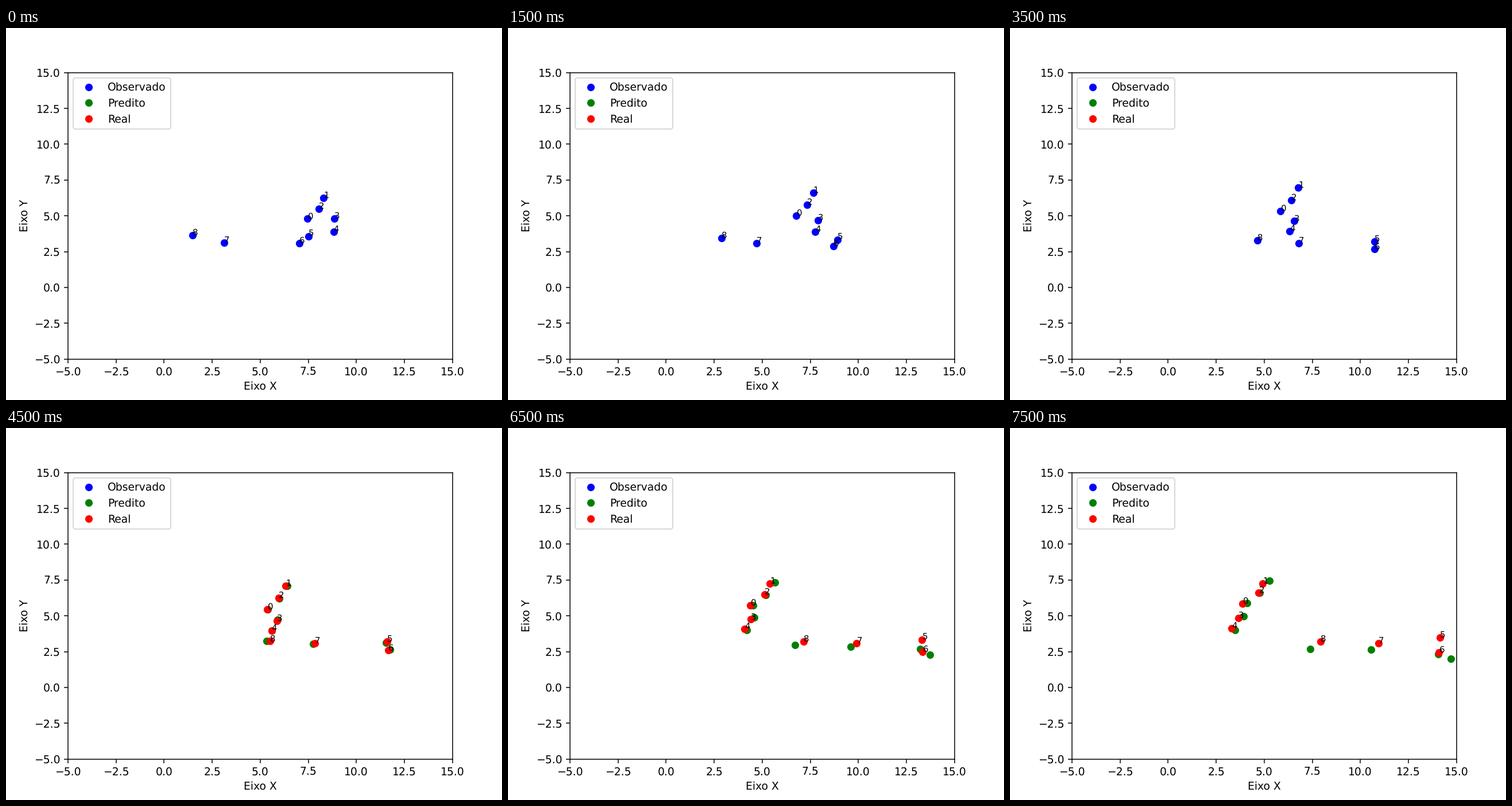
Recreate the animation shown at these times as a matplotlib script. Size 864 by 648 pixels, loop 8000 ms.

```python
import matplotlib.pyplot as plt
import numpy as np
from matplotlib.animation import FuncAnimation

WIDTH, HEIGHT, DPI = 864, 648, 135
N_FRAMES, INTERVAL = 16, 500
LAST_SEEN, LAST = 7, N_FRAMES - 1

# Each walker: start, position when last observed, end, forecast end (stage x, y).
WALKERS = np.array([
    [(525, 332.4), (471, 319.2), (405, 305.8), (413, 305.2)],
    [(553, 296.2), (502.3, 277.6), (440.4, 271.3), (452.5, 266.2)],
    [(545, 315.4), (489.7, 300.2), (433.5, 287), (435, 287.3)],
    [(572, 332), (495.3, 336.5), (398, 331), (406.8, 327.7)],
    [(570.5, 355), (487.3, 353.8), (386.5, 348.7), (392, 351.7)],
    [(527, 363.2), (634.6, 372.3), (749.2, 365.3), (745.8, 394.3)],
    [(511, 375), (635.4, 385.4), (747.5, 390.8), (768, 401.7)],
    [(380, 374), (503, 375.2), (641.8, 375.2), (629, 386)],
    [(324.6, 361.2), (431.4, 370.2), (541, 371.5), (523, 384.8)],
])

plt.rcParams["text.hinting"] = "none"
fig, ax = plt.subplots(figsize=(WIDTH / DPI, HEIGHT / DPI), dpi=DPI)
ax.set(xlim=(-5, 15), ylim=(-5, 15), xlabel="Eixo X", ylabel="Eixo Y")

flipped = (WALKERS * (1, -1) + (0, HEIGHT)).reshape(-1, 2)
start, seen, end, forecast_end = (
    ax.transData.inverted().transform(flipped).reshape(WALKERS.shape).swapaxes(0, 1))


def track(step):
    """Smooth path through start, last observed position and end."""
    early = (seen - start) / LAST_SEEN
    late = (end - seen) / (LAST - LAST_SEEN)
    bend = (late - early) / LAST
    return start + early * step + bend * step * (step - LAST_SEEN)


def forecast(step):
    """Constant speed along x; walkers heading right sink gradually."""
    t = (step - LAST_SEEN) / (LAST - LAST_SEEN)
    change = forecast_end - seen
    sink = np.where(change[:, 0] > 0, t ** 2, t)
    return seen + change * np.column_stack([np.full(len(seen), t), sink])


observed, = ax.plot([], [], "o", color="blue", label="Observado")
predicted, = ax.plot([], [], "o", color="green", label="Predito")
real, = ax.plot([], [], "o", color="red", label="Real")
labels = [ax.text(0, 0, str(i), fontsize=8) for i in range(len(WALKERS))]
ax.legend(loc="upper left")


def update(step):
    here, nothing = track(step), np.empty((0, 2))
    if step <= LAST_SEEN:
        groups = here, nothing, nothing
    else:
        groups = nothing, forecast(step), here
    for line, points in zip((observed, predicted, real), groups):
        line.set_data(points[:, 0], points[:, 1])
    for label, point in zip(labels, here):
        label.set_position(point)
    return observed, predicted, real, *labels


anim = FuncAnimation(fig, update, frames=N_FRAMES, interval=INTERVAL, repeat=True, repeat_delay=0)
plt.show()
```
